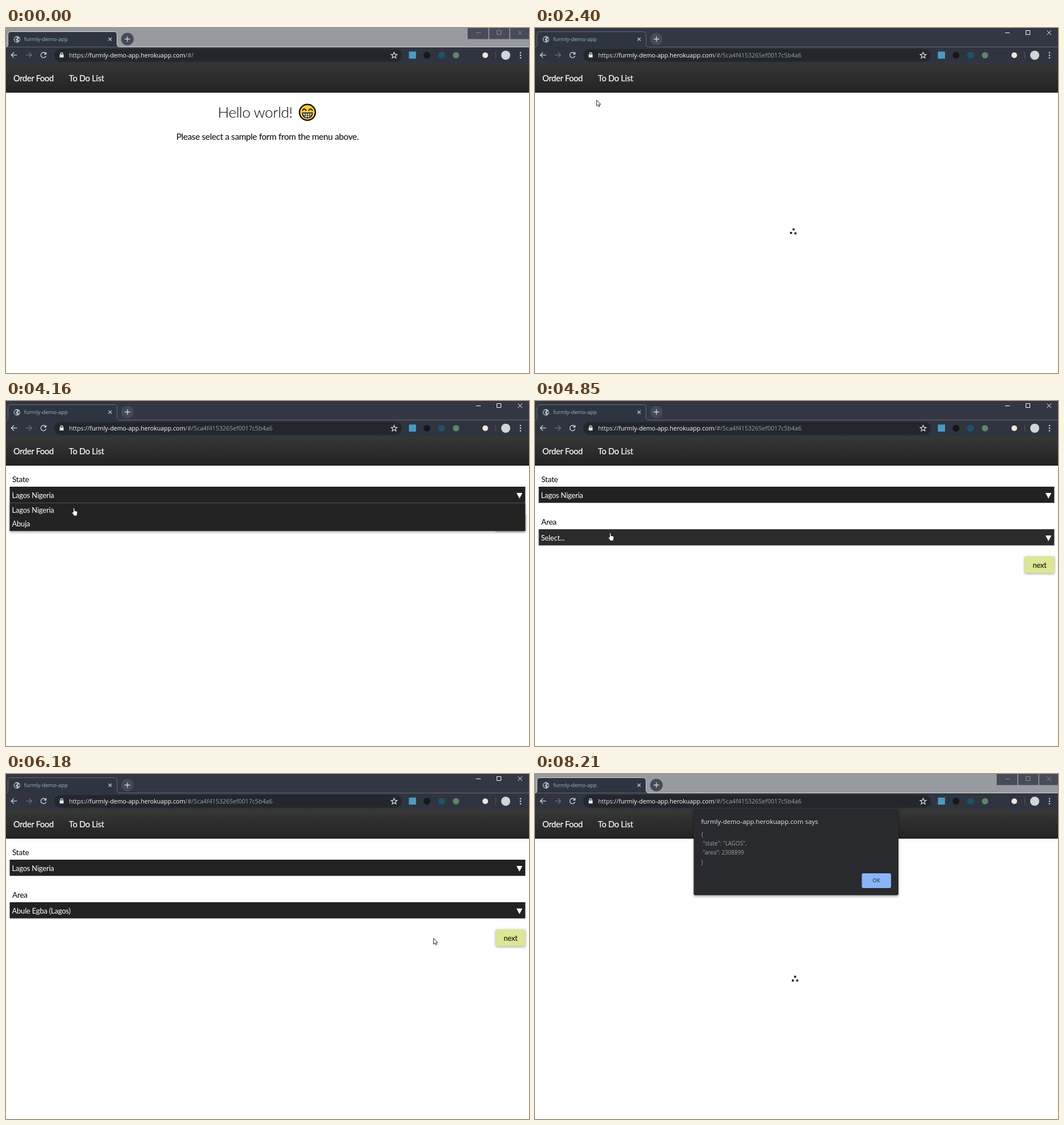
Recreate the animation shown at these times as an HTML page. Size 921x608 px, loop 8.28 s.

```html
<!DOCTYPE html>
<html lang="en">
<head>
<meta charset="utf-8">
<title>Form demo</title>
<style>
  html, body { margin: 0; width: 100%; height: 100%; overflow: hidden; background: #fff; }
  svg { display: block; }
  .page { font: 400 13px Lato, sans-serif; letter-spacing: -.22px; fill: #000; }
  .page .light { fill: #fff; }
  .ui { font: 10.65px "Open Sans", "Noto Sans", sans-serif; }
  .nav { font: 400 14.6px Lato, sans-serif; letter-spacing: -.25px; fill: #fff; stroke: #fff; stroke-width: .2; }
  .line { fill: none; stroke: #d5d8dc; stroke-width: 1.3; }
  .buttons { fill: none; stroke: #fff; stroke-width: 1; }
  .drop { filter: drop-shadow(0 2px 2px rgba(0, 0, 0, .4)); }
  .raised { filter: drop-shadow(0 1px 2px rgba(0, 0, 0, .4)); }
</style>
</head>
<body>
<svg width="921" height="608" viewBox="0 0 921 608">
  <defs>
    <linearGradient id="navFill" x2="0" y2="1">
      <stop stop-color="#373737"/><stop offset="1" stop-color="#222"/>
    </linearGradient>
    <path id="tab" d="M0 33.5Q3.5 33.5 3.5 29V12Q3.5 6.5 9 6.5H190Q195.5 6.5 195.5 12V28Q195.5 33.5 201 33.5H921"/>
    <path id="caret" d="M899 162h10.4l-5.2 10z" fill="#fff"/>
    <path id="controls" d="M828 8.5h8M864.5 4.5h7v7h-7zM901.5 4.5l7.5 7.5m0-7.5l-7.5 7.5"/>
    <g id="dots">
      <circle cy="-4.4" r="1.9"/><circle cx="3.9" cy="2.2" r="1.9"/><circle cx="-3.9" cy="2.2" r="1.9"/>
    </g>
  </defs>
  <rect width="921" height="608" fill="#fff"/>

  <!-- page -->
  <g class="page">
    <g id="hello">
      <text x="373" y="158" font-size="26.2" font-weight="300" letter-spacing="-.4">Hello world!</text>
      <g transform="translate(530.8 148.6)" fill="none" stroke="#000" stroke-width="1.7" stroke-linecap="round">
        <circle r="14" fill="#fcc63c" stroke-width="2.2"/>
        <path d="M-8.6-3.4q3-5 6.2 0M2.4-3.4q3.2-5 6.2 0"/>
        <path d="M-8.6 1.2H8.6Q8.4 9.8 0 9.8T-8.6 1.2Z" fill="#fff" stroke-width="1.5"/>
        <path d="M-7.6 5.2H7.6M-4 1.5V8.6M0 1.5V9.5M4 1.5V8.6" stroke-width="1"/>
      </g>
      <text x="460.5" y="197" font-size="15.4" letter-spacing="-.35" text-anchor="middle">Please select a sample form from the menu above.</text>
    </g>

    <g id="form">
      <text x="11" y="143" font-size="13.6">State</text>
      <rect id="state" x="6.5" y="151" width="908" height="28.5" fill="#222"/>
      <use href="#caret"/>
      <text id="statePick" class="light" x="10.5" y="170.5">Select...</text>
      <text id="stateValue" class="light" x="10.5" y="170.5">Lagos Nigeria</text>
      <g id="areaField">
        <text x="11" y="218" font-size="13.6">Area</text>
        <rect id="area" x="6.5" y="226" width="908" height="28.5" fill="#222"/>
        <use href="#caret" y="75"/>
        <text id="areaPick" class="light" x="10.5" y="245.5">Select...</text>
        <text id="areaValue" class="light" x="10.5" y="245.5">Abule Egba (Lagos)</text>
      </g>
      <g id="next">
        <rect id="button" class="raised" x="862.5" y="199" width="52" height="29.5" rx="1" fill="#dce694"/>
        <text x="888.5" y="219" font-size="12.9" text-anchor="middle">next</text>
      </g>
      <g id="stateList">
        <rect class="drop" x="6.5" y="179.5" width="908" height="49.5" fill="#222"/>
        <text class="light" x="10.5" y="196.5">Lagos Nigeria</text>
        <text class="light" x="10.5" y="221.3">Abuja</text>
      </g>
      <g id="areaList">
        <rect class="drop" x="6.5" y="254.5" width="908" height="137.5" fill="#222"/>
        <rect x="907" y="255" width="7.5" height="11" fill="#1c5a6b"/>
        <svg x="6.5" y="254.5" width="900" height="137" id="areaRows"></svg>
      </g>
    </g>

    <g id="load1"><g id="spin1"><use href="#dots" transform="translate(0 -2.05) rotate(46)"/></g></g>
    <g id="load2"><g id="spin2"><use href="#dots" transform="translate(0 -2.05) rotate(46)"/></g></g>
  </g>

  <rect y="63" width="921" height="51" fill="url(#navFill)"/>
  <text class="nav" x="13" y="94">Order Food</text>
  <text class="nav" x="110.8" y="94">To Do List</text>

  <!-- browser frame -->
  <rect width="921" height="34" fill="#323743"/>
  <rect class="blurred" width="921" height="34" fill="#979a9e"/>
  <rect y="34" width="921" height="29" fill="#2f343f"/>
  <use href="#tab" fill="#2f3540" stroke="#646974"/>
  <use href="#tab" class="blurred" fill="none" stroke="#d3d6d9"/>
  <use href="#controls" class="buttons"/>
  <g class="blurred">
    <path d="M813 0h36.5v19.5H813zM851 0h35.5v19.5H851zM888 0h33v19.5h-33z" fill="#484c58"/>
    <use href="#controls" class="buttons" style="stroke: #8d9199"/>
  </g>

  <circle cx="19.3" cy="20" r="5.7" fill="#b9bec2"/>
  <path d="M15 17l4-1 1 2-3 2 2 2-1 3-3-3zM21 19l3-1v3l-2 2z" fill="#3c444e"/>
  <circle cx="213.8" cy="19.5" r="11" fill="#454a58"/>
  <g class="line">
    <path d="M209 19.5h9.6M213.8 14.7v9.6"/>
    <path d="M180.5 17l5.5 5.5m0-5.5l-5.5 5.5" style="stroke: #a5ccd6"/>
    <path d="M19.5 47.7H9.5M14 43l-4.7 4.7L14 52.4"/>
    <path d="M35 47.7h10M40.5 43l4.7 4.7-4.7 4.7" style="stroke: #6b717b"/>
    <path d="M69.8 44.8a4.7 4.7 0 1 0 .7 4.5M70.6 42.5v3.5h-3.5"/>
  </g>
  <rect x="85" y="37" width="612" height="22.5" rx="11.25" fill="#23272c"/>
  <rect x="94.5" y="46.5" width="7" height="5.5" rx=".6" fill="#e4e6e8"/>
  <path class="line" d="M96 47v-1.5a2 2 0 0 1 4 0V47"/>
  <path class="line" d="M683.5 42.8l1.5 3.5 3.8.3-2.9 2.5.9 3.7-3.3-2-3.3 2 .9-3.7-2.9-2.5 3.8-.3z"/>
  <rect x="709.5" y="41.5" width="12.5" height="12.5" fill="#4b9ac4"/>
  <circle cx="741.3" cy="48" r="6" fill="#15171a"/>
  <circle cx="767" cy="48" r="6" fill="#20506c"/>
  <circle cx="792.5" cy="48" r="5.6" fill="#62836c"/>
  <circle cx="844" cy="48" r="5" fill="#efe6d8"/>
  <path d="M862.5 42v12" stroke="#535965"/>
  <circle cx="880" cy="48" r="8" fill="#d3d5d6"/>
  <g fill="#d5d8dc"><circle cx="906" cy="43.5" r="1.3"/><circle cx="906" cy="48" r="1.3"/><circle cx="906" cy="52.5" r="1.3"/></g>

  <g class="ui">
    <text x="32" y="23.3" font-size="9.4" fill="#93bcc8">furmly-demo-app</text>
    <text x="111" y="52" fill="#9aa0a6"><tspan fill="#dfe2e5">https://</tspan><tspan fill="#fff">furmly-demo-app.herokuapp.com</tspan>/#/<tspan id="hash">5ca4f4153265ef0017c5b4a6</tspan></text>
    <g id="alert">
      <path class="drop" d="M279.5 62H640V211q0 2.5-2.5 2.5H282q-2.5 0-2.5-2.5z" fill="#292a2d"/>
      <text x="292.5" y="87.5" font-size="11.4" fill="#e8eaed">furmly-demo-app.herokuapp.com says</text>
      <g font-size="9.9" fill="#9aa0a6">
        <text x="292.5" y="110">{</text>
        <text x="295.5" y="126.2">"state": "LAGOS",</text>
        <text x="295.5" y="142.3">"area": 2308899</text>
        <text x="292.5" y="158.5">}</text>
      </g>
      <rect x="575.5" y="175" width="51.5" height="26" rx="3" fill="#8ab4f8"/>
      <text x="601" y="191.3" font-size="9.5" text-anchor="middle" fill="#202124">OK</text>
    </g>
  </g>

  <g id="cursor" fill="#fff" stroke="#111" stroke-width=".9" stroke-linejoin="round">
    <path id="arrow" d="M.5.5V11L2.9 8.8 4.5 12.3 6.1 11.6 4.6 8.2H7.8Z"/>
    <path id="hand" d="M2.4 8.2V1.7a1.2 1.2 0 0 1 2.4 0V5.4l4 .9a1.4 1.4 0 0 1 1.1 1.6L9.4 11.5 8.7 14.5H3.8L.6 9.7a1 1 0 0 1 1.8-1.5Z"/>
  </g>
</svg>

<script>
const LOOP = 8280;
const STEP = 'step-end';

const rows = ['Abule Egba', 'Ikorodu - Central', 'Abidemi Adelanwa Estate', 'Satellite Town', 'Eleko Beach', 'Iyana Ipaja'];
document.getElementById('areaRows').innerHTML = rows
  .map((name, i) => `<text class="light" x="4" y="${17.5 + i * 24.75}">${name} (Lagos)</text>`)
  .join('');

// Each key is [ms, value, easing]; the first and last values are held.
function play(selector, prop, ...keys) {
  const first = keys[0], last = keys[keys.length - 1];
  if (first[0] > 0) keys.unshift([0, first[1]]);
  if (last[0] < LOOP) keys.push([LOOP, last[1]]);
  const frames = keys.map(([ms, value, easing = 'linear']) => ({ offset: ms / LOOP, [prop]: value, easing }));
  for (const el of document.querySelectorAll(selector)) {
    el.animate(frames, { duration: LOOP, iterations: Infinity });
  }
}

// Each span is [start, fully in, start of exit, gone]; spans may touch the loop ends.
function fade(selector, ...spans) {
  const keys = spans.flatMap(([a, b, c, d]) => [[a, 0], [b, 1], [c, 1], [d, 0]]);
  play(selector, 'opacity', ...keys.filter(([ms, value]) => value || (ms > 0 && ms < LOOP)));
}
const show = (selector, ...spans) => fade(selector, ...spans.map(([a, b]) => [a, a, b, b]));
const move = (x, y) => `translate(${x}px, ${y}px)`;
const slideOut = (selector, from, to) =>
  play(selector, 'transform', [from, move(0, 0)], [to, move(0, 45)]);

function hover(selector, a, b, c, d) {
  play(selector, 'fill', [a, '#222'], [b, '#333'], [c, '#333'], [d, '#222']);
}

function spin(selector, x, y, angle, at, from, to) {
  const pose = ms => `translate(${x}px, ${y}px) rotate(${angle + (ms - at) * 420 / 1090}deg)`;
  play(selector, 'transform', [from, pose(from)], [to, pose(to)]);
}

show('.blurred', [0, 1330], [7850, LOOP]);
play('#hash', 'fillOpacity', [2040, 0], [2040, 1]);

fade('#hello', [0, 0, 2080, 2320]);
slideOut('#hello', 2080, 2320);

fade('#load1', [2200, 2320, 2540, 2700]);
slideOut('#load1', 2540, 2700);
spin('#spin1', 456.3, 360.85, -41, 2400, 2200, 2700);

fade('#form', [2560, 2760, 6740, 6960]);
slideOut('#form', 6740, 6960);

hover('#state', 2920, 3150, 3450, 3620);
show('#statePick', [0, 4160]);
show('#stateValue', [4160, LOOP]);
fade('#stateList', [3210, 3630, 4160, 4400]);

show('#areaField', [4450, LOOP]);
hover('#area', 4750, 4950, 5560, 5780);
show('#areaPick', [0, 5560]);
show('#areaValue', [5560, LOOP]);
fade('#areaList', [5020, 5380, 5560, 5780]);

play('#next', 'transform', [4450, move(0, 0)], [4450, move(0, 75)]);
const lift = (y, blur) => `drop-shadow(0 ${y}px ${blur}px rgba(0, 0, 0, .4))`;
play('#button', 'filter', [6260, lift(1, 2)], [6480, lift(3, 4)], [6720, lift(3, 4)], [6800, lift(1, 2)]);

fade('#load2', [6860, 6980, LOOP, LOOP]);
spin('#spin2', 456, 362.3, 14, 7120, 6860, LOOP);
fade('#alert', [7850, 7930, LOOP, LOOP]);

show('#arrow', [130, 1080], [2120, 2920], [5860, 6330], [6850, 7580]);
show('#hand', [1080, 2120], [2920, 5860], [6330, 6850]);

const path = [
  [130, 508, 460, STEP], [210, 422, 352, STEP], [440, 300, 240, STEP], [510, 194, 145],
  [760, 194, 145], [1140, 70, 112], [1290, 70, 112], [1380, 62, 110],
  [1520, 62, 110], [1830, 50, 100], [2000, 50, 100], [2300, 108, 126.5],
  [2480, 108, 126.5], [2780, 140, 146], [2860, 140, 146], [3150, 155, 162],
  [3420, 155, 162], [3620, 143, 178], [3700, 143, 178], [4010, 116, 188],
  [4550, 116, 188], [4800, 129, 232], [5000, 129, 232], [5350, 115.5, 266],
  [5560, 115.5, 266], [5780, 107, 250, STEP], [5860, 430, 270, STEP], [5930, 752, 289],
  [6180, 752, 289], [6480, 885, 286], [6720, 885, 286], [7080, 858, 470.5],
  [7160, 858, 470.5], [7500, 858, 586]
];
play('#cursor', 'transform', ...path.map(([ms, x, y, easing]) => [ms, move(x, y), easing]));
</script>
</body>
</html>
```
